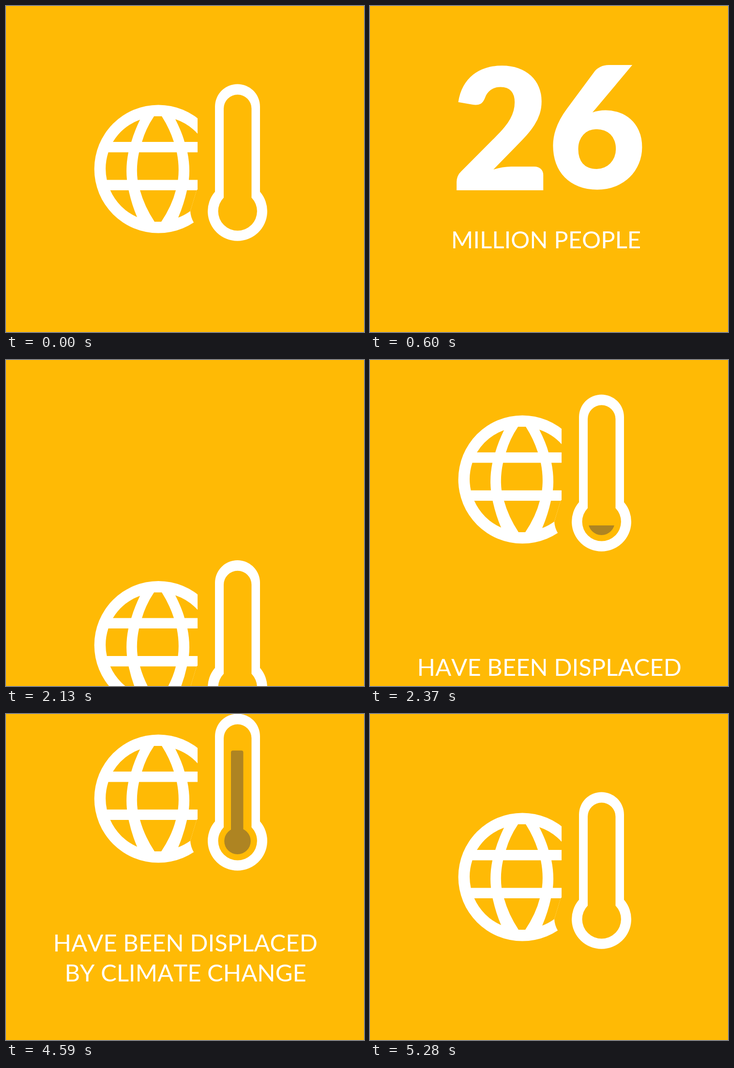
An HTML page for the animation above (5520 ms loop, 740 px wide and 674 px high).

```html
<!DOCTYPE html>
<html lang="en">
<head>
<meta charset="utf-8">
<title>Displaced by climate change</title>
<style>
  html, body { margin: 0; height: 100%; overflow: hidden; background: #ffba05; }
  svg { display: block; }
  text { font: 49px Lato, sans-serif; font-kerning: none; fill: #fff; text-anchor: middle; }
  #number text { font-size: 350px; font-weight: 900; }
</style>
</head>
<body>
<svg width="740" height="674" viewBox="0 0 740 674">
  <defs>
    <clipPath id="globeCut"><path d="M170 190H396V379.5L394 381 381 424Q381.500 436 388 447.500L400 480H170Z"/></clipPath>
    <clipPath id="level"><rect id="levelBox" x="440" y="452" width="80" height="230"/></clipPath>
  </defs>

  <g id="icon">
    <g clip-path="url(#globeCut)">
      <circle cx="315" cy="337" r="132.500" fill="#fff"/>
      <path fill="#ffba05" d="
        M221 281A109.500 109.500 0 0 1 277 235Q265 260 259 281Z
        M306 228H322Q338 253 347 281H281Q289 253 306 228Z
        M350 234Q364 262 369 281H396V264A109.500 109.500 0 0 0 350 234Z
        M211.500 302.500H253Q247 332 250 359.500H208.500A109.500 109.500 0 0 1 211.500 302.500Z
        M275 302.500H353Q359 332 355.500 359.500H272Q268.500 332 275 302.500Z
        M375 302.500H397V359.500H378Q381 332 375 302.500Z
        M215.500 381H253.500Q260 411 271 436.500A109.500 109.500 0 0 1 215.500 381Z
        M277 381H351Q343 413 321 446H307Q286 414 277 381Z
        M374 381H396L381 424A109.500 109.500 0 0 1 356 437.500Q368 409 374 381Z"/>
    </g>
    <path fill="#fff" fill-rule="evenodd" d="
      M432 208a46.500 46.500 0 0 1 93 0V384A61.500 61.500 0 1 1 432 384Z
      M450 212a28.750 28.750 0 0 1 57.500 0V396.200A40.200 40.200 0 1 1 450 396.200Z"/>
    <g clip-path="url(#level)" fill="#ae8422">
      <rect x="465" y="237.500" width="25.500" height="180" rx="4"/>
      <circle cx="478.500" cy="424.700" r="27.300"/>
    </g>
  </g>

  <g id="number"><text x="270 469" y="381 377">26</text></g>
  <g id="people"><text x="364" y="500.700">MILLION PEOPLE</text></g>
  <g id="cause">
    <text x="370.700" y="491">HAVE BEEN DISPLACED</text>
    <text x="371" y="553">BY CLIMATE CHANGE</text>
  </g>
</svg>
<script>
const LOOP = 5520, STEP = 30;
const $ = id => document.getElementById(id);

// Distance below the resting place, slowing to a stop at time `end`
const enter = (t, end) => {
  const k = Math.max(0, (end - t) / STEP);
  return 85 * k ** 3 / (k * k + 17.6);
};
// Upward travel at constant speed from time `start`
const leave = (t, start) => -72 * Math.max(0, (t - start) / STEP);
const place = (id, y) => $(id).setAttribute('transform', `translate(0 ${y})`);
const pass = (t, end, start) => enter(t, end) + leave(t, start);

function draw(t) {
  const iconY = t < 1000 ? leave(t, 0)
    : t < 4950 ? pass(t, 2310, 4560) - 90
    : enter(t, 5280);
  place('icon', iconY);
  place('number', pass(t, 480, 1830));
  place('people', pass(t, 600, 1860));
  place('cause', pass(t, 2490, 4590));

  const level = t < 4950 ? Math.min(215, Math.max(0, (t - 2330) / 2)) : 0;
  $('levelBox').setAttribute('y', 452 - level);
}

function tick() {
  const t = performance.now() % LOOP;
  draw(Math.floor(t / STEP) * STEP);
  requestAnimationFrame(tick);
}
tick();
</script>
</body>
</html>
```
